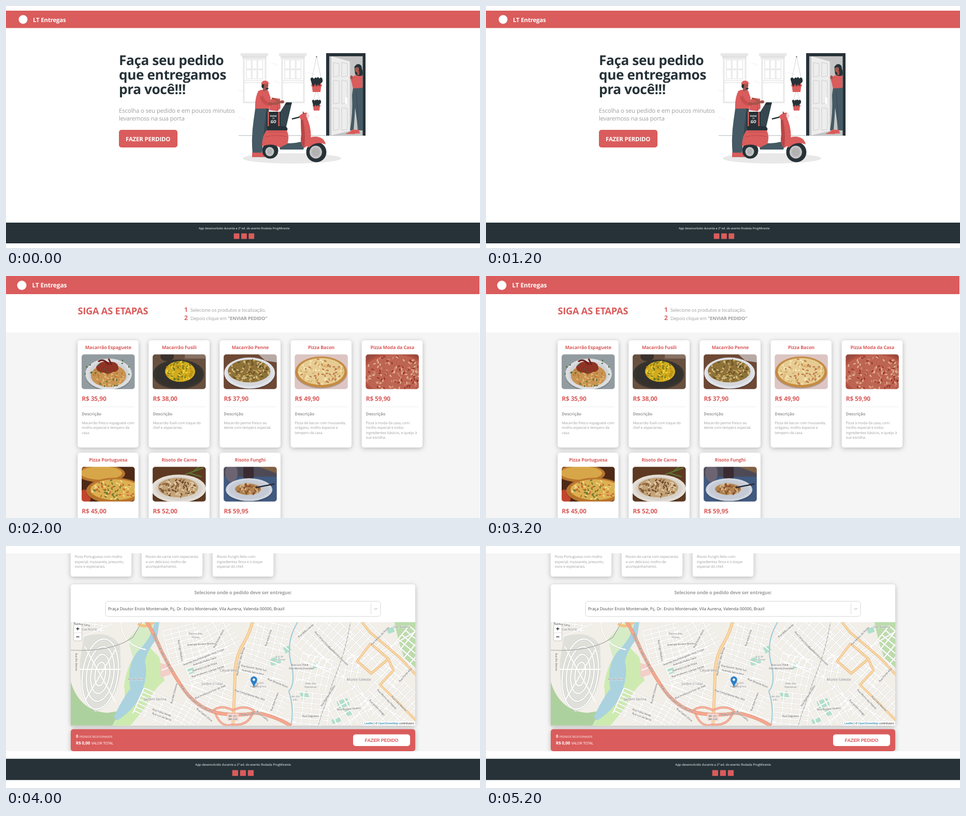
Write an HTML page that moves like this. It is 915 px wide and 467 px high and loops after 6 s.

```html
<!DOCTYPE html>
<html lang="pt-BR">
<head>
<meta charset="utf-8">
<title>Delivery</title>
<style>
html, body { margin: 0; width: 100%; height: 100%; overflow: hidden; background: #fff; }
svg { display: block; width: 915px; height: 467px; }
text { font-family: "Open Sans", sans-serif; letter-spacing: -.015em; white-space: pre; text-rendering: geometricPrecision; }
.plain { letter-spacing: 0; }
.arial { font-family: "Liberation Sans", Arial, sans-serif; }
.mid { text-anchor: middle; }
.map text { letter-spacing: 0; paint-order: stroke; stroke: #fff; stroke-opacity: .7; stroke-width: 1px; }
.card { filter: drop-shadow(0 2px 5px rgba(0, 0, 0, .25)); }
.soft { filter: blur(.5px); }
</style>
</head>
<body>
<svg id="stage" viewBox="0 0 915 467" xmlns="http://www.w3.org/2000/svg"></svg>
<script>
const RED = '#da5c5c', DARK = '#263238', SLATE = '#455a64', GREY = '#9e9e9e', PALE = '#e8e8e8', SKIN = '#a3564b';

const rect = (x, y, w, h, fill, rx = 0, more = '') =>
  `<rect x="${x}" y="${y}" width="${w}" height="${h}" rx="${rx}" fill="${fill}" ${more}/>`;
const oval = (x, y, rx, ry, fill, more = '') =>
  `<ellipse cx="${x}" cy="${y}" rx="${rx}" ry="${ry}" fill="${fill}" ${more}/>`;
const shape = (d, fill) => `<path d="${d}" fill="${fill}"/>`;
const line = (d, color, w = 1, more = '') =>
  `<path d="${d}" fill="none" stroke="${color}" stroke-width="${w}" stroke-linejoin="round" ${more}/>`;
const text = (x, y, s, size, fill, weight = 400, cls = '', more = '') =>
  `<text x="${x}" y="${y}" font-size="${size}" fill="${fill}" font-weight="${weight}" class="${cls}" ${more}>${s}</text>`;
const lines = (x, y, step, rows, ...style) => rows.map((s, i) => text(x, y + i * step, s, ...style)).join('');

function seeded(s) {
  return () => {
    s = (s + 0x6d2b79f5) | 0;
    let t = Math.imul(s ^ (s >>> 15), 1 | s);
    t = (t + Math.imul(t ^ (t >>> 7), 61 | t)) ^ t;
    return ((t ^ (t >>> 14)) >>> 0) / 4294967296;
  };
}

function footer(y, h, cx, k) {
  const icon = (x, w) => rect(cx + x * k, y + 20.8 * k, w * k, 10.8 * k, RED, 1);
  return rect(0, y, 915, h, DARK) +
    text(cx, y + 12.8 * k, 'App desenvolvido durante a 2ª ed. do evento Rodada ProgMirante', 5.72 * k, '#fff', 400, 'plain mid') +
    icon(-20, 10.8) + icon(-5.6, 10.8) + icon(8.7, 10.8);
}

/* ---------- home ---------- */
function windowFrame(x) {
  let s = rect(x, 91, 53, 5.5, PALE) + rect(x + 3, 96, 47, 4.5, '#e2e2e2') +
    rect(x + 6, 101, 42, 85, '#fff', 0, `stroke="${PALE}" stroke-width="3"`) +
    line(`M${x + 6} 144h42M${x + 6} 148h42`, PALE, 1.6);
  for (let i = 0; i < 6; i++)
    s += rect(x + 11 + (i % 3) * 11, 104 + (i > 2) * 19, 9.5, 17.5, '#fff', 0, `stroke="${PALE}" stroke-width="1.5"`);
  return s;
}

function pot(x, y, k) {
  return `<g transform="translate(${x} ${y}) scale(${k})">` +
    shape('M-9.500 4h19l-2 16h-15z', RED) + rect(-10, 6, 20, 3, '#c94f4f') +
    shape('M-11-2q-2-5 2-6q3 0 4 3q2-5 5-2q4-4 5 1q4-4 6 0q2 5-1 8l-3 2-1 5-3-4-3 4-3-5-3 6-3-5z', DARK) + '</g>';
}

function doorway() {
  let s = rect(618, 91, 76, 159, DARK) + rect(624, 97, 64.5, 153, '#c4c4c4') +
    shape('M628 97L664 107V241L628 249.500z', '#ededed') + line('M664 107V241', '#cfcfcf', 1);
  for (const [y, h] of [[109, 26], [143, 44], [196, 42]])
    for (const x of [632, 648])
      s += line(`M${x} ${y}l11 2v${h - 2}l-11 2z`, '#c9c9c9', .9);
  return s + rect(655, 176, 4, 13, '#fff', 1.5) +
    shape('M670 158L689 156V240H680L674 196 671 240H664Q670 205 668 172z', SLATE) +
    line('M676 165Q680 200 679 238', '#37474f', .8) +
    shape('M656 246q8-2 13-8l6 1-1 8H657zM672 240l9-2 2 8h-16z', RED) +
    shape('M669 137q7-7 19-6v27l-18 1q-4-12-1-22z', RED) +
    shape('M673 124q-1-10 6-12q8 0 8 9q3 7 1 13q-9 3-14-3z', DARK) +
    oval(677.5, 122.5, 4, 5.5, SKIN) + rect(678, 126, 4, 7, SKIN) +
    shape('M672 119q3-8 10-5q-2 5-10 5z', DARK) +
    line('M684 141L672 153 668 142', RED, 5) + oval(667, 138, 2.6, 4, SKIN);
}

function courier() {
  return shape('M488 192H508L505 240 501 268H490z', '#37474f') +
    shape('M482 192H503Q498 240 494 285H476Q473 255 478 220z', SLATE) +
    shape('M475 283h22l3 8H475z', RED) + line('M475 291h25', '#b94646', 1) +
    shape('M487 164q9-5 19-1l5 15-3 20H481q-1-20 6-34z', RED) +
    rect(496, 155, 7, 9, SKIN) + oval(500.5, 153, 6, 7.5, SKIN) +
    shape('M494 151q-2 4 1 8l3-2V150z', DARK) + shape('M493 152q-1-8 8-8q6 1 6 5l3 1q-8-1-17 2z', RED) +
    shape('M503 158l4 0-2 4-4-1z', DARK);
}

function scooter() {
  return shape('M527 208L541 186H552L541 233H529z', '#37474f') + shape('M541 186h11l-3 5h-11z', DARK) +
    rect(503, 204, 27, 28, DARK) + rect(505, 204, 2.5, 28, RED) + rect(525.5, 204, 2.5, 28, RED) +
    text(516, 213.5, 'FOOD', 4.6, '#fff', 700, 'mid') + text(516, 218, 'TO', 3, '#fff', 700, 'mid') +
    text(516, 226, 'GO', 8, '#fff', 700, 'mid', 'font-style="italic"') +
    oval(510, 279, 15.5, 15.5, DARK) + oval(509, 281, 8.5, 9, '#c4c4c4') + oval(509, 281, 5, 5.5, '#b2b2b2') +
    shape('M526 262Q548 268 569 262L577 268 574 277H529z', SLATE) +
    shape('M503 232H538Q545 234 543 240L505 243z', DARK) +
    shape('M503 240H542Q548 252 543 266L529 273Q512 263 494 271Q494 251 503 240z', RED) +
    line('M500 253Q520 247 542 252M505 243l36 0', '#b94646', .9) +
    shape('M569 218L581 216Q592 240 587 267L575 274Q567 264 570 250z', RED) +
    shape('M569 218l4-1q6 28 3 56-9-8-6-23z', '#b94646') +
    oval(599, 282, 19.5, 19.5, DARK) + oval(598, 282, 12, 12.5, '#c4c4c4') + oval(598, 282, 8, 8.5, '#b2b2b2') +
    shape('M576 267Q582 251 599 252Q615 254 617 267Q598 260 585 273z', RED) +
    line('M552 218L568 214', DARK, 2.8) + shape('M565 213Q574 204 582 206L585 213 580 219H569z', RED) +
    oval(582, 211, 2.4, 5, '#f2d5d5') + line('M575 208l-2-4', DARK, 1.5);
}

function home() {
  let bricks = '';
  for (const [x, y] of [[516, 145], [447, 162], [448, 215], [594, 214], [582, 128], [512, 111]])
    bricks += `M${x} ${y}h9M${x + 5} ${y + 3}h9`;
  return rect(0, 9, 915, 33.5, RED) + oval(33, 26, 8.5, 8.5, '#fff') +
    text(52, 30.6, 'LT Entregas', 11.44, '#fff', 700) +
    lines(218, 114, 28, ['Faça seu pedido', 'que entregamos', 'pra você!!!'], 26.2, DARK, 700) +
    lines(218, 205.5, 15.6, ['Escolha o seu pedido e em poucos minutos', 'levaremoss na sua porta'], 11.44, GREY) +
    rect(218, 239, 113, 34, RED, 4.8) + text(231, 261, 'FAZER PERDIDO', 11.44, '#fff', 700) +
    line(bricks, '#eee', .8) + windowFrame(453) + windowFrame(527) +
    line('M449 250H694', '#8b9296', .7) +
    line('M590 143L599.500 97 609 143M592 186L599.500 162 607 186', '#b9b9b9', .6) + oval(599.5, 98, 1, 1, DARK) +
    pot(599.5, 146, 1) + pot(599.5, 187, .74) + doorway() +
    oval(552, 294, 95, 10, PALE) + courier() + scooter() +
    shape('M510 182l5-5 14 2 1 18-6 6-16-2z', RED) + line('M510 182l14 3 5-6M524 185v18', '#b94646', .8) +
    line('M493 174Q497 190 513 189', '#c94f4f', 7) + line('M507 188Q522 190 530 185', SKIN, 4.6) +
    oval(533, 185, 4, 3, SKIN) + line('M513 178q8 2 14 6', SKIN, 3) +
    footer(418, 40, 459.7, 1);
}

/* ---------- products ---------- */
// bg, plate, food, [plate x y rx ry], [food x y rx ry], bit colours, bit count
const photos = [
  ['#929ca0', '#dcdde0', '#c99352', [52, 38, 45, 30], [52, 41, 34, 22], ['#b97f39', '#dfb574'], 70],
  ['#68503f', '#36332f', '#d2ab1e', [50, 38, 49, 28], [53, 33, 29, 20], ['#f0cf35', '#b98d12', '#6e7a24'], 80],
  ['#6d4835', '#dfe2e8', '#8f7238', [50, 36, 49, 30], [49, 32, 41, 22], ['#c3a25a', '#66522a', '#d4c084'], 90],
  ['#dcc5c3', '#c58b42', '#e6cc92', [51, 34, 50, 30], [51, 33, 45, 26], ['#f4e5b5', '#c07a48', '#d9b06a'], 110],
  ['#9a4a3e', '#b2503e', '#bd6552', [54, 40, 66, 44], [55, 38, 60, 38], ['#e0b596', '#9c3530', '#d08a74'], 150],
  ['#4d2a17', '#b9752d', '#dcb050', [64, 46, 55, 25], [65, 44, 48, 20], ['#c66a33', '#f0d98c', '#6f7a35'], 70],
  ['#5d3922', '#e3ddd5', '#c3a378', [50, 42, 53, 27], [49, 40, 39, 19], ['#e2cfaa', '#70472a', '#94693f'], 90],
  ['#425a80', '#d0d5df', '#b08250', [49, 44, 45, 22], [47, 43, 25, 11], ['#8b4f2c', '#d2b688'], 45]
];

function photo(x, y, i) {
  const [bg, plate, food, p, f, tints, n] = photos[i], rnd = seeded(i * 37 + 5);
  const bit = ([cx, cy, rx, ry], rx2, ry2, color) => {
    const a = rnd() * 6.283, d = Math.sqrt(rnd()) * .95, px = cx + Math.cos(a) * d * rx, py = cy + Math.sin(a) * d * ry;
    return oval(px.toFixed(1), py.toFixed(1), rx2, ry2, color,
      `transform="rotate(${(rnd() * 180) | 0} ${px.toFixed(1)} ${py.toFixed(1)})"`);
  };
  let s = rect(-3, -3, 109, 73, bg);
  if (i === 1) s += oval(28, 4, 13, 9, '#39302d') + rect(62, -3, 44, 11, '#877264');
  if (i === 2) s += shape('M64-3H106V16L80 12z', '#b7a9a4');
  if (i === 5) s += oval(38, 13, 46, 17, '#b9752d') + oval(38, 12, 40, 13, '#d6a648') + oval(6, 58, 12, 14, '#c2452e');
  if (i === 6) s += line('M62 15L98 2M70 12l24 7M78 9l12-9', '#5d7a35', 2);
  if (i === 7) s += rect(-3, -3, 109, 22, '#4d4a56') + rect(38, -3, 20, 27, '#392b31', 5) + oval(15, 12, 12, 17, '#6c6472') + shape('M60-3H106V14z', '#806043');
  s += oval(p[0], p[1] + 2, p[2], p[3], '#0003') + oval(...p, plate) +
    (i < 4 || i > 5 ? oval(p[0], p[1], p[2] * .86, p[3] * .84, '#0000000d') : '') + oval(...f, food);
  for (let k = 0; k < n; k++) s += bit(f, 2.8, 1.3, tints[k % tints.length]);
  if (i === 0) {
    s += shape('M28 24q10-14 24-9q16-3 19 9q2 10-12 10q-8 7-16 1q-15 0-15-11z', '#8f3424') + line('M32 14q10-8 20 6M52 8l6 12', '#6d2018', 3);
    for (let k = 0; k < 22; k++) s += bit([52, 35, 48, 31], 1.8, 1.1, '#3f6a37');
  }
  if (i === 7) s += line('M62 40L98 33', '#262a35', 2.4);
  return `<g transform="translate(${x} ${y})" clip-path="url(#photoClip)"><g class="soft">${s}</g></g>`;
}

const products = [
  ['Macarrão Espaguete', '35,90', ['Macarrão fresco espaguete com', 'molho especial e tempero da', 'casa.']],
  ['Macarrão Fusili', '38,00', ['Macarrão fusili com toque do', 'chef e especiarias.']],
  ['Macarrão Penne', '37,90', ['Macarrão penne fresco ao', 'dente com tempero especial.']],
  ['Pizza Bacon', '49,90', ['Pizza de bacon com mussarela,', 'orégano, molho especial e', 'tempero da casa.']],
  ['Pizza Moda da Casa', '59,90', ['Pizza à moda da casa, com', 'molho especial e todos', 'ingredientes básicos, e queijo à', 'sua escolha.']],
  ['Pizza Portuguesa', '45,00', ['Pizza Portuguesa com molho', 'especial, mussarela, presunto,', 'ovos e especiarias.']],
  ['Risoto de Carne', '52,00', ['Risoto de carne com especiarias', 'e um delicioso molho de', 'acompanhamento.']],
  ['Risoto Funghi', '59,95', ['Risoto Funghi feito com', 'ingredientes finos e o toque', 'especial do chef.']]
];

function card(x, y, i) {
  const [name, price, about] = products[i];
  return rect(x, y, 117.5, i < 5 ? 207 : 197.5, '#fff', 5, 'class="card"') +
    text(x + 59, y + 17, name, 9, RED, 700, 'mid') + photo(x + 7.7, y + 27.3, i) +
    text(x + 8, y + 117.3, 'R$ ' + price, 12, RED, 700) +
    line(`M${x + 8} ${y + 128.5}h102`, '#e6e6e6', .7) +
    text(x + 8, y + 144.8, 'Descrição', 8, GREY, 700) + lines(x + 8, y + 161.5, 9.5, about, 7, GREY);
}

function menu() {
  return rect(0, 0, 914, 35, RED) + oval(30.5, 18, 9, 9, '#fff') + text(50.5, 22.3, 'LT Entregas', 12, '#fff', 700) +
    rect(0, 109, 914, 358, '#f5f5f5') + text(138.5, 74.3, 'SIGA AS ETAPAS', 18.3, RED, 700) +
    text(344, 69, '1', 12, RED, 700) + text(356, 68.5, 'Selecione os produtos e localização.', 9, GREY) +
    text(344, 85.3, '2', 12, RED, 700) +
    text(356, 84.8, 'Depois clique em <tspan font-weight="700">"ENVIAR PEDIDO"</tspan>', 9, GREY) +
    products.map((p, i) => card(138.3 + (i % 5) * 137.1, i < 5 ? 124 : 341, i)).join('');
}

/* ---------- checkout ---------- */
// centre, size, angle, street gaps
const blocks = [
  [160, 152, 62, 22, 8, 14, 9], [345, 190, 70, 70, -14, 15, 9], [405, 180, 80, 62, -28, 17, 9], [395, 232, 92, 52, -18, 24, 8],
  [395, 288, 78, 62, 22, 20, 9], [505, 182, 76, 70, 14, 13, 12], [495, 240, 84, 44, 20, 22, 9], [498, 300, 88, 48, 24, 15, 10],
  [612, 180, 84, 92, 42, 11, 18], [595, 245, 62, 64, 14, 12, 17], [590, 315, 70, 62, 6, 17, 10], [665, 315, 74, 66, -30, 12, 17],
  [690, 195, 76, 80, 45, 11, 22], [765, 215, 58, 110, 40, 16, 11], [742, 300, 94, 92, 44, 10, 20], [295, 316, 86, 54, 24, 22, 8],
  [355, 330, 44, 44, 30, 14, 8], [665, 240, 44, 58, 12, 12, 15]
];

const labels = [
  [140, 163, 'ercial Norte', 6.5], [366, 171, 'Bairro das', 5.5], [366, 178, 'Flores', 5.5], [398, 268, 'Jardim Cristal', 6.5],
  [429, 242, 'Cajuarana', 7], [288, 298, 'Jardim Serina', 7], [681, 260, 'Monte Celeste', 7], [588, 267, 'Vale das', 5.5],
  [588, 274, 'Paineiras', 5.5], [488, 266, 'Vila dos', 5.5], [487, 273, 'Ferroviários', 5.5], [764, 158, 'São Nivaldo', 6],
  [251, 259, 'Rio do Seixo', 5.5], [528, 215, 'Vila do', 4.8], [528, 221, 'Horizonte', 4.8], [558, 292, 'Vale dos', 4.8], [558, 298, 'Ipês', 4.8]
];

const streets = [
  [382, 216, -21, 'Avenida Desembargador Alvo Tristal'], [377, 191, -3, 'Avenida Nuvem Branca'], [384, 224, -18, 'Avenida Pedra Clara'],
  [384, 235, -18, 'Avenida Lua de Prata'], [390, 244, -18, 'Rua Professor Campo Verde'], [395, 283, -23, 'Rua Professora Flor do Vale'],
  [478, 237, 11, 'Rua Doutor Vento Sul'], [476, 245, 11, 'Avenida Serra Azul'], [470, 289, 18, 'Rua Comandante Mar Alto'], [524, 266, 22, 'Rua Mirante Novo'],
  [567, 231, 0, 'Rua Lua Cheia'], [570, 238, 0, 'Rua Monte Dourado'], [300, 323, 20, 'Rua Folha Verde'], [300, 331, 20, 'Rua Luz da Serra'],
  [146, 153, 8, 'Rua Boa Safra'], [612, 185, 48, 'Rua Campo Estrelado'], [640, 213, 44, 'Rua Marinha Dourada'], [723, 175, -45, 'Rua Ventos do Norte'],
  [734, 297, 46, 'Rua Morro das Pedras'], [757, 305, 46, 'Rua Clara Manhã'], [715, 313, 46, 'Rua Jardim Antigo'], [662, 316, -4, 'Rua Bosque Sereno'],
  [623, 290, -57, 'Rua Bambuzal Velho'], [508, 178, -72, 'Rua Areia Fina'], [412, 180, -62, 'Rua Pomar Novo'], [335, 202, 80, 'Rua Trigo Maduro'],
  [134, 224, 90, 'Rua Rio Manso'], [326, 285, -75, 'Rua Mel Silvestre'], [494, 329, 40, 'Rua Orvalho'], [382, 327, 40, 'Rua Capim Doce'],
  [772, 250, -48, 'Rua Ponte Alta'], [588, 330, 0, 'Rua Salgueiro'], [580, 165, -40, 'Rua Milho Verde'], [520, 301, -70, 'Rua Sete Pontes']
];

function grid([x, y, w, h, a, dx, dy]) {
  let d = '';
  for (let i = -w / 2; i <= w / 2; i += dx) d += `M${i} ${-h / 2}v${h}`;
  for (let j = -h / 2; j <= h / 2; j += dy) d += `M${-w / 2} ${j}h${w}`;
  return { d, more: `transform="translate(${x} ${y}) rotate(${a})"` };
}

const road = (d, edge, fill, w) => line(d, edge, w + 1) + line(d, fill, w);

function cityMap() {
  const roads = blocks.map(grid);
  roads.push({ d: 'M125 185L205 150M222 147Q222 190 270 200M300 240Q360 215 445 205M335 262L440 300M445 240L545 262M440 300L560 340M480 147L570 220 640 250M545 147L690 290 790 346M560 260Q620 250 680 205M600 346L650 250 790 165M660 346L745 250', more: '' });
  const highway = 'M268 140Q284 165 300 203Q330 262 352 288Q380 319 420 324Q455 328 482 322Q515 326 550 347';
  const avenue = 'M478 140Q470 170 459 187Q442 215 442 250Q441 290 438 350';
  const east = 'M682 140L702 166 760 215 800 258M704 188L678 222 705 246 738 218 704 188M738 218L748 240 722 268 800 345';
  let s = rect(125, 147, 665, 200, '#f2efe9') +
    shape('M205 347Q235 310 228 270 235 215 270 188L296 215 306 260Q285 275 270 310L240 347z', '#cdebb0') +
    shape('M125 262Q142 318 195 322L222 318 205 347H125z', '#add19e') + shape('M235 180L268 147H288L275 186 245 215z', '#d6ecc6') +
    shape('M750 147H790V235L768 215 757 180z', '#bcdcab') + shape('M150 175Q200 160 220 192L222 240Q212 308 172 320 140 288 143 220z', '#dfe0da') +
    shape('M287 147Q280 180 252 206Q232 235 240 275Q222 300 208 330L214 337Q245 318 259 290Q276 250 268 222Q275 196 291 180L296 147z', '#aad3df') +
    shape('M298 226l18 4 2 18-20 6z', '#f3cfc8');
  const ring = (i, color, w) => oval(182, 247, 34 - i * 8, 68 - i * 15, 'none', `stroke="${color}" stroke-width="${w}" transform="rotate(8 182 247)"`);
  for (let i = 0; i < 4; i++) s += ring(i, '#c3c5be', 3.6) + ring(i, '#fff', 2.4);
  s += line('M142 238h80M152 194l60 108M212 199l-60 100', '#fff', 1.8);
  for (const [x, y, w, h] of [[508, 218, 20, 14], [535, 196, 13, 12], [567, 284, 15, 13], [638, 300, 22, 15], [652, 318, 14, 12], [628, 335, 17, 9], [590, 228, 14, 10], [350, 238, 12, 10], [735, 160, 13, 10]])
    s += rect(x, y, w, h, '#aee0cb', 1, `transform="rotate(-18 ${x} ${y})"`);
  s += roads.map(r => line(r.d, '#d3d0cb', 2.7, r.more)).join('') + roads.map(r => line(r.d, '#fff', 2, r.more)).join('') +
    line('M563 147Q540 185 550 225T546 280Q557 315 550 347', '#9fcddb', 2.2) +
    line('M665 147Q656 205 632 260L602 347M125 201Q205 205 245 176L262 147', '#a3a3a3', 1.2) +
    line('M665 147Q656 205 632 260L602 347', '#fff', .7, 'stroke-dasharray="4 4"') +
    road(east, '#d4a45c', '#fcd6a4', 3.4) + road(avenue, '#d4a45c', '#fcd6a4', 4.6) +
    road('M255 150Q268 160 285 147', '#d4a45c', '#fcc27f', 3.5) +
    road('M402 316Q412 352 437 345Q470 348 478 317Q460 306 438 317Q416 306 402 316z', '#cf8069', '#f9b29c', 3) +
    road(highway, '#cf8069', '#f5a78f', 5.5) +
    `<path id="highway" d="${highway}" fill="none"/><path id="avenue" d="M444 300Q443 245 456 205Q470 175 478 147" fill="none"/>`;
  const along = (id, at, t) => `<text font-size="5.2" fill="#3b302b" dy="1.8"><textPath href="#${id}" startOffset="${at}">${t}</textPath></text>`;
  s += along('highway', 34, 'Rodovia Governador Hélio Bruma') + along('highway', 146, 'Rodovia Governador Hélio Bruma') +
    along('highway', 282, 'Rodovia BR-230') + along('avenue', 50, 'Avenida Flor das Serras');
  for (const [x, y, a, t] of streets) s += text(x, y, t, 5, '#444', 400, 'mid', `transform="rotate(${a} ${x} ${y})"`);
  for (const [x, y, t, size] of labels) s += text(x, y, t, size, '#777', 400, x < 150 ? '' : 'mid');
  s += rect(427, 323, 22, 14, '#f8d5ca', 1.5) + text(438, 329.5, 'BR-101', 5, '#333', 400, 'mid') + text(438, 335.5, 'BR-230', 5, '#333', 400, 'mid');
  return `<g class="map" clip-path="url(#mapClip)">${s}</g>`;
}

function checkout() {
  let s = rect(0, 14, 915, 382, '#f5f5f5') + '<g clip-path="url(#pageClip)">';
  for (let i = 0; i < 3; i++) s += card(124.7 + i * 137.1, -138.4, i + 5);
  s += '</g>' + rect(125, 74, 665, 272.5, '#fff', 5, 'class="card"') +
    text(457.5, 93.4, 'Selecione onde o pedido deve ser entregue:', 9, GREY, 700, 'mid') +
    rect(192, 106.7, 531, 29.3, '#fff', 5, 'stroke="#ccc" stroke-width=".8"') +
    text(197, 124.2, 'Praça Doutor Enzio Montervale, Pç. Dr. Enzio Montervale, Vila Aurena, Valenda 00000, Brazil', 8, '#4a4a4a', 400, 'plain') +
    line('M704.500 110.500v21.500', '#ccc', .7) + line('M711 120l2.800 2.800 2.800-2.800', '#c4c4c4', 1.1) + cityMap() +
    rect(130.5, 152, 16, 31, '#fff', 2, 'stroke="#0003"') + line('M131 167.500h15', '#ccc', .6) +
    line('M135.500 159.700h6M138.500 156.700v6M135.500 175.300h6', '#111', 1.2) +
    oval(482, 270, 7, 2, '#0003', 'transform="rotate(-35 482 270)"') +
    shape('M478.500 272.500Q476 266 473 262Q471 257 473.500 254Q478.500 249 483.500 254Q486 257 484 262Q481 266 478.500 272.500z', '#2a81cb') +
    oval(478.5, 258, 2.4, 2.4, '#fff') +
    rect(690, 338, 100, 8.5, '#ffffffb8') +
    text(692, 344.2, '<tspan fill="#0078a8">Leaflet</tspan> | © <tspan fill="#0078a8">OpenStreetMap</tspan> contributors', 5.5, '#333', 400, 'arial plain') +
    rect(125, 353.5, 665, 42.5, RED, 5, 'class="card"') + rect(0, 396, 915, 15, '#fff') +
    text(135, 370.3, '0', 8, '#fff', 700) + text(142, 370.3, 'PEDIDOS SELECIONADOS', 5.5, '#fff') +
    text(135, 383.2, 'R$ 0,00', 8, '#fff', 700) + text(164.7, 383.2, 'VALOR TOTAL', 7, '#fff') +
    rect(670, 363.5, 110, 22.5, '#fff', 5) + text(725, 377.7, 'FAZER PEDIDO', 9, RED, 700, 'mid arial');
  return s + footer(410.6, 41, 457.7, 1.049);
}

const stage = document.getElementById('stage');
stage.innerHTML = `<defs>
  <clipPath id="photoClip"><rect width="102.500" height="67" rx="5"/></clipPath>
  <clipPath id="mapClip"><path d="M125 147H790V346.500H125z"/></clipPath>
  <clipPath id="pageClip"><path d="M0 14H915V396H0z"/></clipPath>
</defs>` + [home, menu, checkout].map(f => `<g class="scene">${f()}</g>`).join('');

const scenes = stage.querySelectorAll('.scene'), HOLD = 2000;
function draw(t) {
  const now = Math.floor(t / HOLD) % scenes.length;
  scenes.forEach((g, i) => { g.style.display = i === now ? '' : 'none'; });
}
const start = performance.now();
function tick() {
  draw(performance.now() - start);
  requestAnimationFrame(tick);
}
tick();
</script>
</body>
</html>
```
